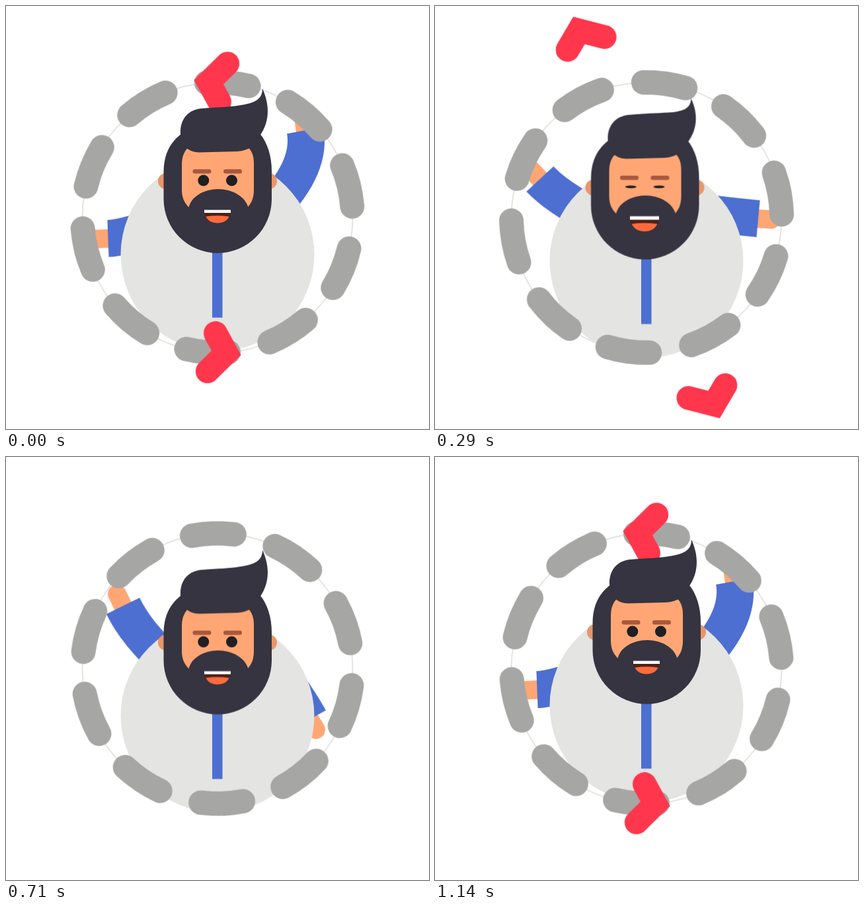
Animation of 640 by 640 pixels, one loop 1210 ms. Source, as an HTML page without scripts:

```html
<!DOCTYPE html>
<html lang="en">
<head>
<meta charset="utf-8">
<title>Spinning ring</title>
<style>
html, body { margin: 0; width: 100%; height: 100%; overflow: hidden; background: #fff; }
svg { display: block; width: 100vw; height: 100vh; }

.bob, .sway, .ring, .dart, .eyes, .mouth, .hair, .swing, .swing path {
  animation: 1210ms linear infinite;
}
.bob { animation-name: bob; }
.sway { animation-name: sway; }
.ring { animation-name: spin; transform-origin: 320px 320px; }
.eyes { animation-name: blink; transform-origin: 320px 264px; }
.mouth { animation-name: laugh; transform-origin: 320px 308.5px; }
.hair { animation-name: flick; }
.left { animation-name: left-swing; }
.left .sleeve { animation-name: left-sleeve; }
.left .hand { animation-name: left-hand; }
.right { animation-name: right-swing; }
.right .sleeve { animation-name: right-sleeve; }
.right .hand { animation-name: right-hand; }

.swing path { fill: none; }
.sleeve { stroke: #4d6fd1; stroke-width: 56; }
.hand { stroke: #ffa674; stroke-width: 28; stroke-linecap: round; }
.dark { fill: #353440; }

/* Each dart dips in from above, grazes the ring and leaves, nose first. */
.dart {
  fill: none; stroke: #ff364c; stroke-width: 36; stroke-linecap: round;
  offset-path: path("M412 -90C412 -20 409 60 394.5 85Q382 106 308 115.5Q290 113 275.5 106Q254 101 220 41.5C208 21 221 0 228 -39L236 -85");
  offset-rotate: auto 180deg;
  animation-name: fly;
}
@keyframes fly {
  0% { offset-distance: 272px; animation-timing-function: cubic-bezier(.36, 0, .6, .6); }
  35.54% { offset-distance: 476px; }
  47.11% { offset-distance: 522px; }
  47.12% { offset-distance: 0px; animation-timing-function: cubic-bezier(.5, 0, .8, .6); }
  71.07% { offset-distance: 178px; animation-timing-function: cubic-bezier(.33, .5, .67, .95); }
  94.21%, 100% { offset-distance: 272px; }
}
@keyframes spin {
  0% { transform: rotate(4.4deg); animation-timing-function: cubic-bezier(.33, .18, .67, .55); }
  35.54% { transform: rotate(-50.9deg); animation-timing-function: cubic-bezier(.33, .37, .67, .75); }
  94.21%, 100% { transform: rotate(-103.6deg); }
}
@keyframes bob {
  0%, 94.21%, 100% { transform: none; animation-timing-function: cubic-bezier(.42, 0, .53, 1); }
  47.11% { transform: translateY(17.5px); animation-timing-function: cubic-bezier(.47, 0, .58, 1); }
}
@keyframes sway {
  0%, 58.68%, 100% { transform: none; animation-timing-function: ease-in; }
  23.97%, 35.54% { transform: translateX(-2.5px); }
}
@keyframes laugh {
  0%, 58.68%, 100% { transform: none; }
  23.97%, 35.54% { transform: translateX(-.5px) scale(1.1, 1.15); }
}
@keyframes blink {
  0%, 11.57%, 35.54%, 58.68%, 82.64%, 100% { transform: none; }
  23.97% { transform: scaleY(.25); }
  71.07% { transform: scaleY(0); }
}
@keyframes flick {
  0%, 11.57%, 58.68%, 100% {
    d: path("M264 193C263 170 277 156 297 155C320 153 340 153 355 150C375 147 388 142 388 125C397 145 402 172 383 198C378 210 368 219 350 220L292 221.5C278 221 266 214 264 193Z");
  }
  35.54% {
    d: path("M264 193C263 170 277 156 297 155C318 153 338 152 355 153C380 153 391.5 149 391.5 134.5C399 149 405 174 384 199C378 210 368 219 350 220L292 221.5C278 221 266 214 264 193Z");
  }
}

/* Arms turn about the shoulder while they stretch and bend. */
@keyframes left-swing {
  0%, 94.21%, 100% { transform: none; animation-timing-function: cubic-bezier(.33, .45, .67, .95); }
  47.11% { transform: rotate(75deg); animation-timing-function: cubic-bezier(.33, .05, .67, .55); }
}
@keyframes left-sleeve {
  0%, 94.21%, 100% { d: path("M-90.5 24Q-65 23 0 0"); animation-timing-function: cubic-bezier(.5, 0, .6, .9); }
  47.11% { d: path("M-128.5 21Q-75 18.5 -15 -11"); animation-timing-function: cubic-bezier(.4, .1, .5, 1); }
}
@keyframes left-hand {
  0%, 94.21%, 100% { d: path("M-89 24L-110.5 25"); animation-timing-function: cubic-bezier(.5, 0, .6, .9); }
  47.11% { d: path("M-127 21L-148.5 22"); animation-timing-function: cubic-bezier(.4, .1, .5, 1); }
}
@keyframes right-swing {
  0% { transform: none; animation-timing-function: cubic-bezier(.55, 0, .8, .5); }
  23.97% { transform: rotate(73deg); animation-timing-function: cubic-bezier(.2, .6, .6, 1); }
  47.11% { transform: rotate(126deg); animation-timing-function: cubic-bezier(.6, 0, .9, .5); }
  71.07% { transform: rotate(98deg); animation-timing-function: cubic-bezier(.33, .4, .67, .95); }
  94.21%, 100% { transform: none; }
}
@keyframes right-sleeve {
  0%, 94.21%, 100% { d: path("M52.7 -124Q63 -68 0 -4"); }
  23.97%, 71.07% { d: path("M34.6 -82.5Q22 -51 0 0"); }
  47.11% { d: path("M45.5 -108Q17 -64 0 -6"); }
}
@keyframes right-hand {
  0%, 94.21%, 100% { d: path("M53 -122L50 -144"); }
  23.97%, 71.07% { d: path("M34 -81L41.4 -101"); }
  47.11% { d: path("M45 -107L55 -122.5"); }
}
</style>
</head>
<body>
<svg viewBox="0 0 640 640">
  <circle cx="320" cy="320" r="204.5" fill="none" stroke="#e4e4e2" stroke-width="2"/>

  <g transform="translate(245 328)"><g class="swing left">
    <path class="hand"/>
    <path class="sleeve"/>
  </g></g>
  <g transform="translate(400 312)"><g class="swing right">
    <path class="hand"/>
    <path class="sleeve"/>
  </g></g>

  <g class="bob">
    <circle cx="320" cy="376" r="146.5" fill="#e4e4e2"/>
    <path d="M312 350h15.500v121.500h-15.500z" fill="#4d6fd1"/>
  </g>

  <g class="ring">
    <circle cx="320" cy="320" r="204.5" pathLength="360" transform="rotate(-99 320 320)"
      fill="none" stroke="#a6a6a4" stroke-width="37" stroke-linecap="round" stroke-dasharray="18 18"/>
  </g>

  <path class="dart" d="M24 -32L0 0L20.500 27"/>
  <g transform="rotate(180 320 320)">
    <path class="dart" d="M24 -32L0 0L20.500 27"/>
  </g>

  <g class="bob"><g class="sway">
    <g fill="#e8966a">
      <circle cx="242" cy="265" r="12"/>
      <circle cx="398" cy="265" r="12"/>
    </g>
    <path class="dark" d="M238.500 252C238.500 222 250 205 266 193H384C396 207 402 228 402 250V292A81.750 81.750 0 0 1 238.500 292Z"/>
    <path d="M266 240C266 226 271 218 277 213H365C371 217 375 226 375 238V278C375 291 371 299 365 305H277C270 298 266 290 266 278Z" fill="#ffa674"/>
    <path class="dark" d="M276 307C279 288 300 277 321 277S363 288 367 307Z"/>
    <path class="hair dark"/>
    <g fill="#a8583c">
      <rect x="282.5" y="247" width="28" height="6.5" rx="3.2"/>
      <rect x="329" y="247" width="28" height="6.5" rx="3.2"/>
    </g>
    <g class="eyes" fill="#1f1f24">
      <circle cx="298.8" cy="264" r="8.5"/>
      <circle cx="341.5" cy="264" r="8.5"/>
    </g>
    <g class="mouth">
      <path d="M300 312H340C339 322 331 328.500 320 328.500S301 322 300 312Z" fill="#4a2318"/>
      <path d="M302.500 318.500Q319 316 337.500 318.500C335 325 328 328.500 320 328.500S305 325 302.500 318.500Z" fill="#ff6b3d"/>
      <path d="M300 308.500h40v4.500h-40z" fill="#fff"/>
    </g>
  </g></g>
</svg>
</body>
</html>
```
